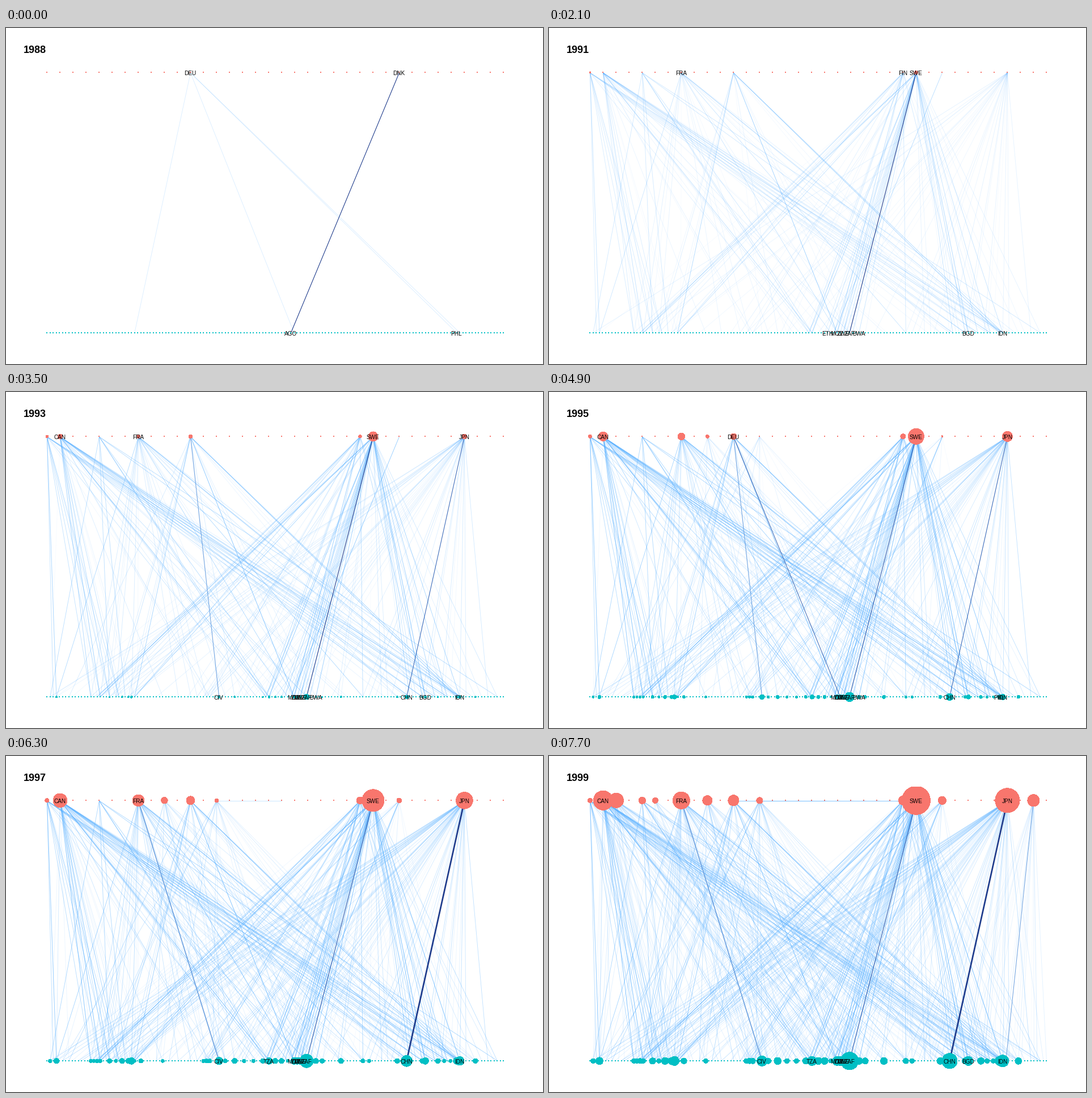
A matplotlib script that plays this animation: 947x592 px, repeating every 8 s.

```python
import numpy as np
import matplotlib.pyplot as plt
from matplotlib.animation import FuncAnimation
from matplotlib.collections import LineCollection
from matplotlib.colors import to_rgba
from matplotlib.patches import Rectangle

W, H, DPI = 947, 592, 64
PT = 72 / DPI  # points per pixel
TOP, BOTTOM = 78, 537
N_TOP, N_BOT = 36, 147
RED, TEAL, BLUE, NAVY = "#F8766D", "#00BFC4", "#56B0FF", "#1F3C8C"
MID, PALE = "#3A66B4", "#6A9FDF"
FIRST, LAST, STEP = 1988, 1999, 7
FRAMES, INTERVAL = 80, 100

top_x = np.linspace(72, 877, N_TOP) + 0.4
bot_x = np.linspace(72, 877, N_BOT) + 0.4

TOP_NAMES = dict(CAN=1, FRA=7, DEU=11, FIN=24, SWE=25, DNK=27, JPN=32)
BOT_NAMES = dict(CIV=55, TZA=71, ETH=76, AGO=78, MOZ=79, ZMB=80, ZWE=81,
                 ZAF=83, BWA=86, EGY=101, CHN=115, BGD=121, PHL=131, IDN=132)
LABELS = [
    "DEU DNK AGO PHL",
    "DEU DNK AGO PHL",
    "FRA FIN SWE DNK ETH AGO ZWE ZAF BWA EGY BGD IDN",
    "FRA FIN SWE ETH MOZ ZWE ZAF BWA BGD IDN",
    "CAN FRA FIN SWE ETH MOZ ZMB ZWE ZAF BWA BGD PHL IDN",
    "CAN FRA SWE JPN CIV MOZ ZMB ZWE ZAF BWA CHN BGD IDN",
    "CAN FRA SWE JPN CIV MOZ ZMB ZWE ZAF BWA CHN IDN",
    "CAN DEU SWE JPN MOZ ZMB ZWE ZAF BWA CHN PHL IDN",
    "CAN FRA SWE JPN CIV MOZ ZMB ZWE ZAF CHN IDN",
    "CAN FRA SWE JPN CIV TZA MOZ ZMB ZWE ZAF CHN IDN",
    "CAN FRA SWE JPN CIV TZA MOZ ZMB ZWE ZAF CHN IDN",
    "CAN FRA SWE JPN CIV TZA MOZ ZMB ZWE ZAF CHN BGD IDN",
]

# donor: (final radius, year before growth, growth power, final link count)
DONORS = {
    0: (4, 1990, 0.5, 10), 1: (17, 1990, 1.3, 56), 2: (13, 1997, 1, 44),
    4: (6, 1997, 1, 12), 5: (5, 1997, 1, 14), 7: (15, 1990, 1.5, 38),
    9: (8.5, 1993, 1, 20), 11: (9.5, 1990, 1, 26), 13: (5.5, 1994, 1, 26),
    24: (8, 1990, 1, 26), 25: (25, 1990, 1, 50), 27: (7, 1994, 1, 18),
    32: (21.5, 1990, 1.5, 66), 34: (10.5, 1997, 0.1, 20),
}

# Long-standing links: donor: (first year, strength, recipients)
WEST, MIDDLE = np.r_[14:25:3], np.r_[70:72]
SOUTH, EAST = np.r_[76:87:2], np.r_[116:133:4]
CORE = {
    0: (1990, 0.4, np.r_[2, 3, WEST, EAST]),
    1: (1991, 0.5, np.r_[WEST, MIDDLE, EAST]),
    4: (1990, 0.45, np.r_[1, 20, 25, MIDDLE, 77, 132, 144]),
    7: (1990, 0.5, np.r_[3, 79, 101, 132]),
    11: (1988, 0.5, np.r_[28, 79, 131, 132]),
    24: (1990, 0.45, np.r_[17, 28, MIDDLE, 79, 81, 101, 121]),
    25: (1990, 0.55, np.r_[16, 17, 28, MIDDLE, SOUTH, 79, 81, EAST, 121]),
    27: (1990, 0.7, np.r_[78]),
}

# (donor, recipient, first year, last year, colour, width)
STRONG = [
    (27, 78, 1988, 1989, NAVY, 1.1), (25, 83, 1990, 1993, NAVY, 1.1),
    (25, 83, 1994, 1999, MID, 1.2), (11, 55, 1993, 1996, PALE, 1),
    (32, 115, 1993, 1995, MID, 1), (32, 115, 1996, 1999, NAVY, 2.7),
    (11, 80, 1995, 1995, MID, 1), (7, 55, 1997, 1999, PALE, 1.6),
    (34, 133, 1998, 1999, PALE, 1),
]

# Links along the upper row: (from, to, first year, opacity)
ALONG = [(13, 18, 1997, 0.3), (11, 24, 1999, 0.7)]

rng = np.random.default_rng(12)


def make_recipients():
    """Final radius of every recipient that grows."""
    small = np.r_[1:4:2, 14:18, 20:31:2, 37, 50:53, 57:67:3, 69:78:2, 86:89:2,
                  94, 101:105:2, 112, 120, 125:130:2, 137]
    radii = {int(i): rng.uniform(3.5, 6.5) for i in small}
    radii |= dict.fromkeys([27, 71, 79, 80, 81, 121, 131], 8)
    radii |= {55: 9, 83: 15.5, 115: 13.5, 132: 10.5}
    return radii


RECIPIENTS = make_recipients()


def make_edges():
    """Links as (donor, recipient, first year, strength)."""
    edges = [(s, d, y, a) for s, (y, a, dests) in CORE.items() for d in dests]
    weight = np.full(N_BOT, 0.8)
    weight[list(RECIPIENTS)] += list(RECIPIENTS.values())
    for s, (_, y0, _, count) in DONORS.items():
        near = np.abs(bot_x - top_x[s]) < (170 if s > 32 else W)
        p = weight * near
        first = max(y0 + 1, 1991)
        years = np.linspace(first - 0.8 * (LAST - first), LAST, count)
        for d, y in zip(rng.choice(N_BOT, count, False, p / p.sum()), years):
            start = max(first, int(np.ceil(y)))
            edges.append((s, d, start, rng.uniform(0.1, 0.42)))
    return sorted(edges, key=lambda e: e[3])


EDGES = make_edges()


def links(year):
    segs, colors, widths = [], [], []

    def add(p, q, color, alpha=1, width=0.85):
        segs.append([p, q])
        colors.append(to_rgba(color, alpha))
        widths.append(width * PT)

    for s, d, start, strength in EDGES:
        if year >= start:
            alpha = strength * (0.45 + 0.16 * min(year - start, 4))
            add((top_x[s], TOP + 1), (bot_x[d], BOTTOM), BLUE, alpha)
    for a, b, start, alpha in ALONG:
        if year >= start:
            add((top_x[a], TOP + 0.5), (top_x[b], TOP + 0.5), BLUE, alpha, 1)
    for s, d, y0, y1, color, width in STRONG:
        if y0 <= year <= y1:
            add((top_x[s], TOP + 1), (bot_x[d], BOTTOM), color, 1, width)
    return segs, colors, widths


def growth(year, start, power=1):
    return max(0, (year - start) / (LAST - start)) ** power


def donor_radii(year):
    return np.array([r * growth(year, y0, p) for r, y0, p, _ in DONORS.values()])


def recipient_radii(year):
    return np.array([r * growth(year, 1990.5, 1 if r > 15 else 1.2)
                     for r in RECIPIENTS.values()])


def areas(radii):
    return np.where(radii > 1.2, (2 * radii * PT) ** 2, 0)


fig = plt.figure(figsize=(W / DPI, H / DPI), dpi=DPI, facecolor="white")
ax = fig.add_axes([0, 0, 1, 1])
ax.set(xlim=(0, W), ylim=(H, 0))
ax.axis("off")

lines = LineCollection([], zorder=1)
ax.add_collection(lines, autolim=False)


def dots(x, y, color, size=0, marker="o", zorder=3):
    return ax.scatter(x, np.full(len(x), y), s=(size * PT) ** 2, c=color,
                      marker=marker, linewidths=0, antialiased=False,
                      zorder=zorder)


dots(top_x, TOP, RED, 2, "s", 2)
dots(bot_x, BOTTOM, TEAL, 2, "s", 2)
donors = dots(top_x[list(DONORS)], TOP + 0.3, RED)
recipients = dots(bot_x[list(RECIPIENTS)], BOTTOM + 0.3, TEAL)
panel = Rectangle((30, 54), 890, 508, transform=ax.transData)
donors.set_clip_path(panel)
recipients.set_clip_path(panel)


def write(x, y, text, size, **style):
    return ax.text(x, y, text, family="Liberation Sans", size=size * PT,
                   va="baseline", color="black", zorder=4, **style)


def row_labels(names, xs, y):
    return {n: write(xs[i] - 0.4, y + 5, n, 10, ha="center")
            for n, i in names.items()}


labels = row_labels(TOP_NAMES, top_x, TOP) | row_labels(BOT_NAMES, bot_x, BOTTOM)
title = write(31, 43.5, "", 18, weight="bold")


def update(frame):
    step = frame // STEP
    year = FIRST + step
    segs, colors, widths = links(year)
    lines.set_segments(segs)
    lines.set_color(colors)
    lines.set_linewidth(widths)
    donors.set_sizes(areas(donor_radii(year)))
    recipients.set_sizes(areas(recipient_radii(year)))
    shown = LABELS[step].split()
    for name, text in labels.items():
        text.set_visible(name in shown)
    title.set_text(str(year))
    return [lines, donors, recipients, title, *labels.values()]


anim = FuncAnimation(fig, update, frames=FRAMES, interval=INTERVAL,
                     repeat=True, repeat_delay=0, blit=False)
plt.show()
```
